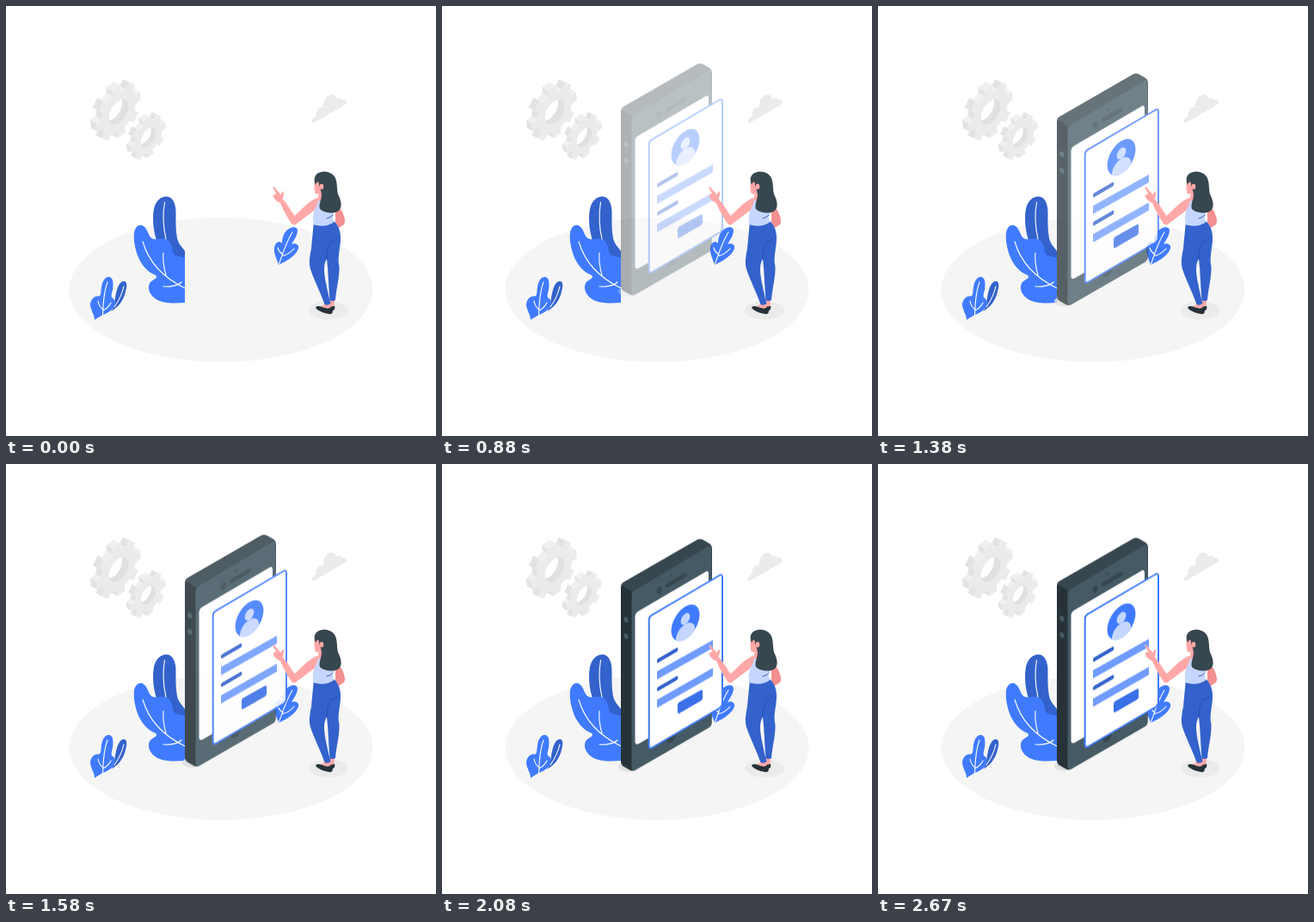
These frames come from a looping animation (500 px wide and 500 px high, 2710 ms). An HTML page:

```html
<!DOCTYPE html>
<html lang="en">
<head>
<meta charset="utf-8">
<title>Sign-up form</title>
<style>
  html, body { margin: 0; width: 100%; height: 100%; overflow: hidden; background: #fff; }
  svg { display: block; width: 100vw; height: 100vh; }
  .blue { fill: #407bff; }
  .navy { fill: #3362cc; }
  .pale { fill: #c6d7ff; }
  .skin { fill: #ffa8a7; }
  .blush { fill: #f28f8f; }
  .ink { fill: #263238; }
  .slate { fill: #37474f; }
  .steel { fill: #455a64; }
  .mist { fill: #ebebeb; }
  .vein { fill: none; stroke: #fff; stroke-width: 1.1; stroke-linecap: round; }
  .fold { fill: none; stroke: #2850ab; stroke-width: .9; stroke-linecap: round; }
  .appear { animation: appear 2.71s step-end infinite; }
  .slide { animation: slide 2.71s cubic-bezier(.36, -.01, .5, 1.38) infinite; }
  @keyframes appear {
    0% { visibility: hidden; }
    12.17%, 100% { visibility: visible; }
  }
  @keyframes slide {
    from { opacity: 0; transform: translateY(-31px); }
    to { opacity: 1; transform: translateY(-1px); }
  }
</style>
</head>
<body>
<svg viewBox="0 0 500 500">
  <defs>
    <clipPath id="disc"><circle r="19"/></clipPath>
  </defs>

  <ellipse cx="250" cy="330" rx="176.5" ry="84" fill="#f5f5f5"/>
  <g id="gears"></g>
  <path class="mist" d="M356 136C354.500 133 358 129 361 128C360 121 364 117 369 118C368 110 373 103 379 103C382 103 384 106 384 109C386 106 389 106 390 109C393 108 396 109 396 112C396 114 394 115 392 116L361 134Q358 136 356 136Z"/>

  <g id="tall-plant">
    <path class="navy" d="M176 275C171 262 170 246 172 236C174 226 181 221 187 221.500C194 222 197.500 230 197.500 240C197.500 250 197 260 199 270C201 278 205 280 208 285V296H180Z"/>
    <path class="blue" d="M149 264C150 256 156 253 160 256C166 260 165 270 172 271C179 272 185 268 190 274C195 280 192 287 197 290C201 292 205 291 208 293V345C194 346 180 346 172 339C166 334 164 326 168 321C172 317 177 317 174 313C165 310 157 301 153 290C150 281 148 272 149 264Z"/>
    <path class="vein" d="M184.500 228C182 243 183 258 186 271M159 274C166 298 183 316 208 328M183 287C182 297 184 306 186 313M183 326C191 327 200 325 204 321"/>
  </g>

  <g id="small-plant">
    <path class="navy" d="M122 355C127 350 126 342 128 334C130 325 133 320 137 320C141 320 141 326 139 332C137 342 131 350 122 355Z"/>
    <path class="blue" d="M103 365C103 359 99 355 98 348C98 342 102 336.500 107 337.500C111 338 110 333 111 327C112 319 116 314.500 120 315C125 316 125 323 124 330C123 334 122 337 123 339C126 341 128 343 126 349C123 356 115 357 103 365Z"/>
    <path class="vein" d="M118 321C113 334 113 347 112.500 360M107 343C108 348 110 351 113 353M122 345C120 349 117 352 113 354M137 326C135 335 131 343 126 350"/>
  </g>

  <g id="right-plant">
    <path class="blue" d="M317 301C315 294 311 288 312 281C313 275 318 272 321 276C321 268 324 262 329 259C334 256 339 257 339 261C339 267 334 273 332 277C336 275 341 277 340 282C338 289 328 296 317 301Z"/>
    <path class="vein" d="M333 263C326 274 322 287 317.500 300M316 281C317 285 319 287 322 289M335 282C331 287 327 289 322 290.500"/>
  </g>

  <g class="appear"><g class="slide">
    <ellipse cx="217" cy="351.500" rx="12" ry="6" fill="#e0e0e0"/>
    <path class="ink" d="M208 143Q208 139 211 137L296 88Q300 85.500 304 88L311 92Q314 94 314 98L313.500 300Q313.500 304 310 306L225 355Q221 357 218 355L211 351Q208 349 208 345Z"/>
    <path class="slate" d="M208.500 140Q209 138 211 137L296 88Q300 85.500 304 88L311 92Q312.500 93 313 94.500L221 148Z"/>
    <path class="steel" d="M220.500 152Q220.500 148.500 223.500 146.500L308 96Q313.500 92.500 313.500 98V300Q313.500 304 310 306L225 355Q220.500 357 220.500 352Z"/>
    <path fill="#fff" d="M224.500 177Q224.500 173 228 170.800L306 125Q310 122.500 310 127V273Q310 277 307 279L229 324.500Q224.500 327 224.500 322Z"/>
    <g class="steel">
      <ellipse cx="214" cy="180.500" rx="2.500" ry="3.500" transform="rotate(-20 214 180.500)"/>
      <ellipse cx="214" cy="199.500" rx="2.500" ry="3.500" transform="rotate(-20 214 199.500)"/>
    </g>
    <path stroke="#37474f" stroke-width="4.600" stroke-linecap="round" d="M262 140.500L282.500 128.500"/>
    <ellipse class="slate" cx="252.800" cy="146.300" rx="3" ry="4.200" transform="rotate(20 252.800 146.300)"/>
    <circle class="slate" cx="267" cy="128.500" r="1.500"/>
    <circle class="slate" r="6" transform="matrix(.866 -.5 0 1 266.500 317)"/>

    <path fill="#fff" stroke="#407bff" stroke-width="2" d="M240.700 181Q240.700 177 243.500 175.300L322.500 129Q326 127 326 131V277Q326 281 323 283L244.500 329Q240.700 331 240.700 327Z"/>
    <g transform="matrix(.866 -.5 0 1 283 184)">
      <circle class="blue" r="19"/>
      <circle class="pale" cy="-4.500" r="6.200"/>
      <ellipse class="pale" cy="14" rx="13" ry="12.500" clip-path="url(#disc)"/>
    </g>
    <path fill="#709cff" d="M250 240.500L315 204V213.300L250 250ZM250 273.500L315 236.500V245.800L250 283Z"/>
    <path class="navy" d="M250 228Q250 226.500 251.500 225.500L273 213Q274.300 212.500 274.300 214V215.500Q274.300 217 273 217.700L251.500 230.200Q250 231 250 229.500ZM250 261Q250 259.500 251.500 258.500L273 246Q274.300 245.500 274.300 247V248.500Q274.300 250 273 250.700L251.500 263.200Q250 264 250 262.500Z"/>
    <path fill="#3a70e8" d="M274 279.500Q274 277.500 276 276.300L301 262.200Q303 261.300 303 263.500V271.500Q303 273.500 301 274.700L276 289.200Q274 290 274 288Z"/>
  </g></g>

  <g id="woman">
    <ellipse class="mist" cx="375" cy="354" rx="23" ry="10.500"/>
    <path class="skin" d="M370 343L382 340L381.500 349L377 351L371 348Z"/>
    <path class="ink" d="M360 351C361 348 365 349 368 350C373 352 377 352 378 349C379 351 382 347 382.300 350C382.500 353 381 354 380 354C380 357 379 359 375 358C369 357 362 354 360 351Z"/>
    <path class="skin" d="M366 349C370 346 376 347 378 350C376 352 372 352 366 349Z"/>
    <path class="blush" d="M383 233C388 234 391 238 392 242C394 247 395 251 393 254L387 258L383 252Z"/>
    <path class="navy" d="M358 251L381 250C387 255 389.500 263 389 272C388.500 283 385 293 387.500 303C388 315 384 329 383 342Q379 344 376.500 342C375 326 375 311 373 294C367 304 371 318 377.500 346Q374 349 370.500 347C366 334 358 318 354 306C352 299 353 292 355 282C356 271 357 260 358 251Z"/>
    <path class="fold" d="M373 294C373 287 374 281 377 276M377 274Q381 275 385 270"/>
    <path class="pale" d="M361 225C358 230 358 235 358 239C356 245 357 250 357.500 254C365 257 376 256 381.500 251C379 246 380 242 384 235L376 222Z"/>
    <path class="fold" d="M373 247Q378 246 380 243"/>
    <path class="skin" d="M362 223C351 227 343 238 335.500 244C331 237 326 229 321.500 224C323 221 323.500 218 322.500 215.500C321 215 320.500 218 319.500 219.500L312 210.500Q310 209.500 310.300 211.500L314.500 218.500C312 218 310 220 311 222C313 226 316 228 319 229C322 237 328 247 332 253Q335 256 338 253L358 238C361 234 364 227 362 223Z"/>
    <path class="skin" d="M360 201C358 206 359 208 358.500 211C358 212 359 213 359 215C359 219 361 219 364 218.500L362 225Q366 229 372 226L372 202Z"/>
    <path class="slate" d="M360 208C357 202 359 195 365 193.500C372 191 380 194 383 200C386 207 384 215 387 221C390 227 391 234 387 238C381 242 371 241 366 237C362 233 367 226 367 219C366 214 365 211 364 208C364 204 362 203 360 208Z"/>
    <ellipse class="skin" cx="367" cy="210" rx="2.300" ry="3.200"/>
  </g>
</svg>
<script>
  const gears = document.getElementById('gears');
  const path = pts => 'M' + pts.map(p => p.map(n => n.toFixed(2)).join(' ')).join('L') + 'Z';
  const add = (d, fill) => {
    const el = document.createElementNS('http://www.w3.org/2000/svg', 'path');
    el.setAttribute('d', d);
    el.setAttribute('fill', fill);
    gears.append(el);
  };

  // Isometric projection of a polar point on the gear's face
  const project = (cx, cy, r, deg) => {
    const a = deg * Math.PI / 180, u = r * Math.cos(a), v = r * Math.sin(a);
    return [cx + .866 * u, cy - .5 * u + v];
  };

  function gear(cx, cy, r, hole, depth, phase) {
    const rim = [], ring = [];
    for (let k = 0; k < 8; k++) {
      const a = phase + 45 * k;
      for (const [f, d] of [[.77, -13], [1, -10], [1, 10], [.77, 13]])
        rim.push(project(cx, cy, r * f, a + d));
    }
    for (let a = 0; a < 360; a += 6) ring.push(project(cx, cy, hole, a));
    const back = ([x, y]) => [x - depth, y - depth * .577];

    rim.forEach((p, i) => {
      const q = rim[(i + 1) % rim.length];
      const dx = q[0] - p[0], dy = q[1] - p[1];
      if (dy * -depth + dx * depth * .577 <= 0) return;
      add(path([p, q, back(q), back(p)]), dx > Math.abs(dy) * .6 ? '#f0f0f0' : '#e3e3e3');
    });
    add(path(rim), '#ebebeb');
    add(path(ring), '#e0e0e0');

    const id = 'hole' + Math.round(cx);
    const clip = document.createElementNS('http://www.w3.org/2000/svg', 'clipPath');
    clip.id = id;
    gears.append(clip);
    add(path(ring), '#fff');
    clip.append(gears.lastChild);
    add(path(ring.map(back)), '#fff');
    gears.lastChild.setAttribute('clip-path', `url(#${id})`);
  }

  gear(131, 123, 30, 13, 7.2, -7);
  gear(165.5, 152.7, 23.5, 10, 5.4, -7);
</script>
</body>
</html>
```
